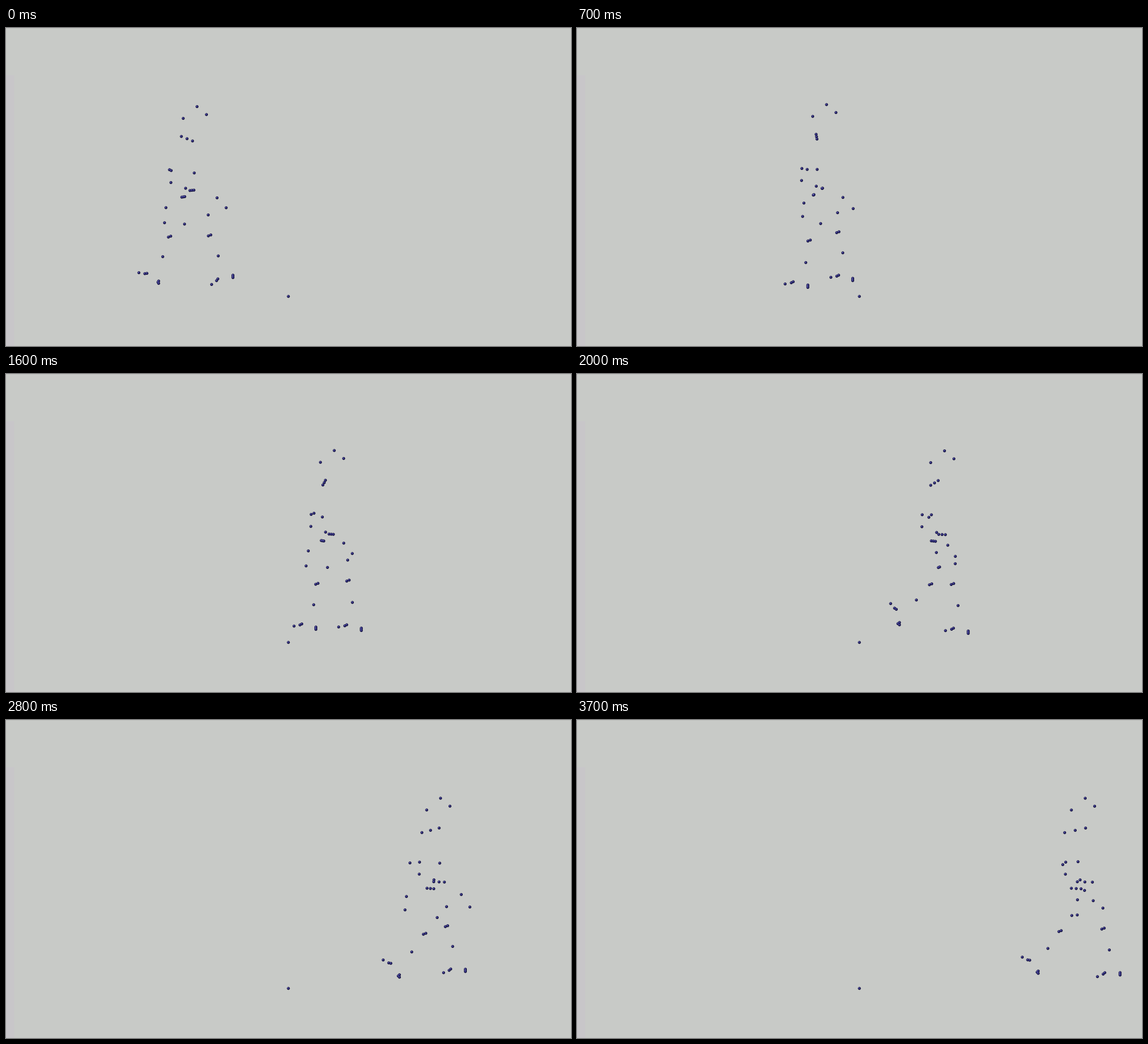
A matplotlib script for the animation above (3.8 s loop, 960 by 540 pixels).

```python
import numpy as np
import matplotlib.pyplot as plt
from matplotlib.animation import FuncAnimation
from matplotlib.patches import Rectangle

W, H, DPI = 960, 540, 100
FRAMES, INTERVAL = 38, 100
LOOP = FRAMES * INTERVAL / 1000
CYCLE = 1.81                      # seconds per double step
NEAR, FAR = 1, -1
EYE = np.array([430, 265])        # vanishing point of the view
GROUND, HEAD_TOP = 435.3, 129.7
THIGH, SHANK, FOOT, STANCE = 82, 74, 38, .55


def wave(t, peak, period=CYCLE):
    return np.cos(2 * np.pi * (t - peak) / period)


def bump(x, centre, width):
    return np.exp(-((x - centre) / width) ** 2)


def direction(degrees):
    """Unit vector: 0 hangs straight down, positive swings forward."""
    a = np.radians(degrees)
    return np.array([np.sin(a), np.cos(a)])


def project(point, depth):
    """Nearer points (positive depth) spread away from the eye point."""
    return EYE + (np.asarray(point) - EYE) * (1 + depth)


def path(t):
    return 324 + 145 * t + 8 * np.sin(np.pi * t / LOOP)


def head(t):
    sway = 5 * wave(t, .14, CYCLE / 2) - 2
    bob = 4 * wave(t, 0, CYCLE / 2)
    return np.array([path(t) + sway, HEAD_TOP + bob])


def row(centre, depth, middle, twist=0):
    """Far, middle and near marker of a line across the body."""
    return [project(centre + np.array([twist * side, 0]), middle + depth * side)
            for side in (FAR, 0, NEAR)]


def torso(t):
    top = head(t)
    swing = wave(t, .8)
    skull = [top, top + (16, 13.5), top + (-23.5, 20)]
    spine = [project(top + p, .02) for p in ((-41, 109), (-41.5, 129), (-17, 138.5))]
    return (skull + spine + row(top + (-17, 54.5), .05, 0, 2 * swing - 1.5)
            + row(top + (-7, 142), .03, .015)
            + row(top + (-21.5, 153), .02, .015))


def arm(t, side):
    swing = wave(t, .75 if side == NEAR else .85 + CYCLE / 2)
    shoulder = head(t) + (-17 + side * (2 * side * swing - 1.5), 54.5)
    elbow = shoulder + 57 * direction(-9 + 11 * swing)
    forearm = direction(17 + 26 * swing)
    wrist = elbow + 61 * forearm
    return [project(p, .06 * side) for p in (elbow, wrist, wrist + 24.3 * forearm)]


def foot(t, side):
    """Toe, pitch and foot axis; planted, then swung one stride ahead."""
    middle = .45 if side == NEAR else .45 + CYCLE / 2
    since = t - middle - STANCE
    n = np.floor((since + .87) / CYCLE)
    s = since - n * CYCLE
    start, end = path(middle + n * CYCLE), path(middle + (n + 1) * CYCLE)

    p = np.clip((s + .08) / .98, 0, 1)
    ease = p * p * (3 - 2 * p)
    heel_up = 67 * bump(s, .16, .24)
    toe_up = 25 * bump(s, .8, .1)
    lift = 18 * np.sin(np.pi * p) * (1 - p) + FOOT * np.sin(np.radians(toe_up))
    toe = np.array([start + (end - start) * ease + FOOT - 37, GROUND - lift])
    pitch = heel_up - toe_up + 4
    return toe, pitch, direction(90 - pitch)


def forward_normal(axis):
    return np.array([axis[1], -axis[0]])


def bend_knee(hip, ankle):
    span = ankle - hip
    reach = np.hypot(*span)
    axis = span / reach
    d = min(reach, .999 * (THIGH + SHANK))
    along = (THIGH ** 2 - SHANK ** 2 + d * d) / (2 * d)
    out = np.sqrt(max(THIGH ** 2 - along ** 2, 0))
    return hip + along * axis * reach / d + out * forward_normal(axis)


def beside(a, b, along, out):
    axis = (b - a) / np.hypot(*(b - a))
    return a + along * axis + out * forward_normal(axis)


def leg(t, side):
    toe, pitch, sole = foot(t, side)
    up = forward_normal(sole)
    heel = toe - FOOT * sole
    ankles = [heel + 10 * sole + 3 * up, heel + 13 * sole + 5 * up]
    hip = head(t) + (-20, 147)
    knee = bend_knee(hip, ankles[1])
    upper = [beside(hip, knee, 52, 16), knee + (-2, .8), knee + (2, -.8),
             beside(knee, ankles[1], 36, 8)]
    inner_toe = toe - (3 * np.sin(np.radians(max(pitch - 4, 0))), 0)
    lower = [heel, *ankles, inner_toe, toe - (0, 2), toe + (0, 2)]
    return ([project(p, .025 * side) for p in upper]
            + [project(p, .02 * side) for p in lower])


def walker(t):
    markers = torso(t)
    for side in (FAR, NEAR):
        markers += arm(t, side) + leg(t, side)
    return np.array(markers + [np.array([480, 456])])


fig = plt.figure(figsize=(W / DPI, H / DPI), dpi=DPI, facecolor="#c8cac7")
ax = fig.add_axes([0, 0, 1, 1])
ax.set(xlim=(0, W), ylim=(H, 0))
ax.axis("off")
ax.add_patch(Rectangle((0, 80), 14, H - 80, color="#c8c6c9", lw=0))
ax.add_patch(Rectangle((0, 0), W, 1, color="#c0c2bf", lw=0))

COUNT = len(walker(0))


def dots(radius, color, shift):
    # One size per dot keeps the positions from snapping to whole pixels.
    sizes = np.full(COUNT, (2 * radius * 72 / DPI) ** 2)
    art = ax.scatter(np.zeros(COUNT), np.zeros(COUNT), s=sizes, c=color, linewidths=0)
    return art, np.array(shift)


layers = [dots(2.5, "#17153f", (-.2, -.2)),
          dots(1.6, "#2c2a7c", (-.4, -.5)),
          dots(.7, "#7f7dc4", (-.9, -1))]


def draw(i):
    spots = walker(i * INTERVAL / 1000)
    for art, shift in layers:
        art.set_offsets(spots + shift)
    return [art for art, _ in layers]


anim = FuncAnimation(fig, draw, frames=FRAMES, interval=INTERVAL, repeat=True,
                     repeat_delay=0, blit=False)
plt.show()
```
